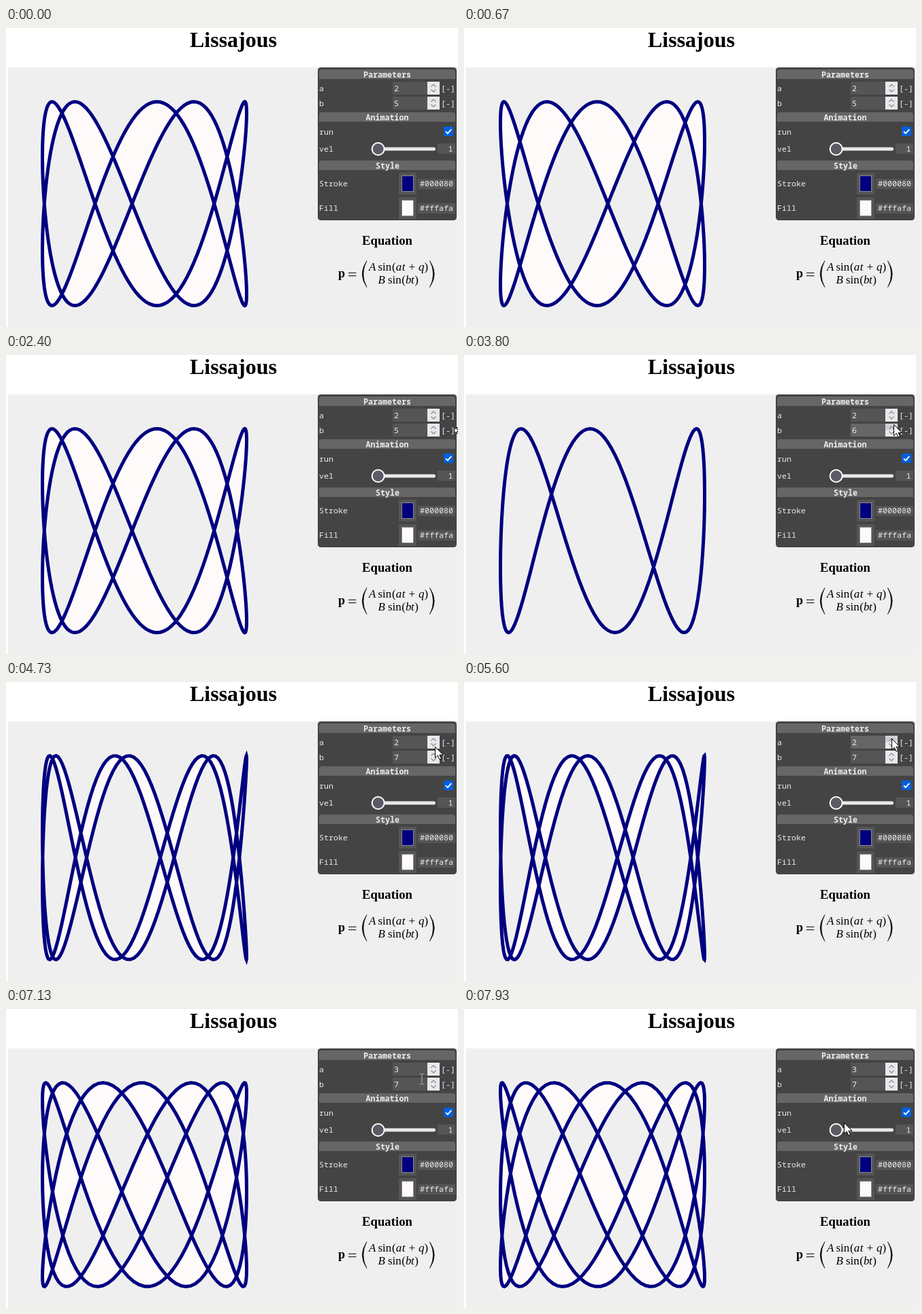
These frames come from a looping animation (664 by 440 pixels, 8 s). An HTML page with a canvas:

```html
<!DOCTYPE html>
<html lang="en">
<head>
<meta charset="utf-8">
<title>Lissajous</title>
<style>
  html, body { margin: 0; width: 100%; height: 100%; overflow: hidden; background: #fff; }
  canvas, svg { position: absolute; left: 0; top: 0; display: block; }
  .mono { font: 11.67px "Noto Sans Mono", "DejaVu Sans Mono", monospace; fill: #ededed; white-space: pre; }
  .head { font-weight: bold; text-anchor: middle; }
  .serif { font-family: "Liberation Serif", "Times New Roman", serif; }
  .title { font-weight: bold; text-anchor: middle; }
  .math { font-size: 17px; }
  .math .i { font-style: italic; }
  .bar { fill: #666; }
  .box { fill: #555; }
  .hover .box { fill: #666; }
  .up { fill: none; }
  .hover .up { fill: #d0d0d7; }
  .chevron { fill: none; stroke: #85858c; stroke-width: 1.2; }
  .check { fill: #0060df; }
  .check.hover { fill: #0250bb; }
</style>
</head>
<body>
<canvas id="stage" width="664" height="440"></canvas>
<svg width="664" height="440" viewBox="0 0 664 440">
  <defs>
    <g id="spinner">
      <rect x="619" width="18" height="19" fill="#e9e9ed"/>
    </g>
    <path id="chevrons" class="chevron" d="M624.5 7.5l3.5-3.5 3.5 3.5M624.5 11.5l3.5 3.5 3.5-3.5"/>
  </defs>

  <text class="serif title" x="334" y="28" font-size="32">Lissajous</text>

  <rect x="458" y="58" width="204" height="225" rx="4.5" fill="#444"/>
  <g class="bar">
    <path id="bar" d="M460 75v-10q0-4 4-4h192q4 0 4 4v10z"/>
    <use href="#bar" y="63"/>
    <use href="#bar" y="134"/>
  </g>
  <g class="mono head">
    <text x="560" y="72.5">Parameters</text>
    <text x="560" y="135.5">Animation</text>
    <text x="560.5" y="206.5">Style</text>
  </g>

  <g id="rowA" transform="translate(0 79)">
    <rect class="box" x="568" width="51" height="19"/>
    <use href="#spinner"/>
    <rect class="up" x="619" width="18" height="9.5"/>
    <use href="#chevrons"/>
    <text class="mono" x="460" y="14">a</text>
    <text class="mono" id="valueA" x="570" y="14">2</text>
    <text class="mono" x="639" y="14">[-]</text>
  </g>
  <g id="rowB" transform="translate(0 101)">
    <rect class="box" x="568" width="51" height="19"/>
    <use href="#spinner"/>
    <rect class="up" x="619" width="18" height="9.5"/>
    <use href="#chevrons"/>
    <text class="mono" x="460" y="14">b</text>
    <text class="mono" id="valueB" x="570" y="14">5</text>
    <text class="mono" x="639" y="14">[-]</text>
  </g>

  <text class="mono" x="460" y="156.5">run</text>
  <rect id="check" class="check" x="643" y="145" width="14" height="14" rx="2"/>
  <path d="M646 152.3l2.8 2.8 5.4-6" fill="none" stroke="#fff" stroke-width="1.9"/>

  <text class="mono" x="460" y="182">vel</text>
  <rect x="547" y="175.5" width="84" height="5" rx="2.5" fill="#e9e9ed"/>
  <circle cx="546.7" cy="178" r="9" fill="#5b5b66" stroke="#fff" stroke-width="2"/>
  <rect class="box" x="634" y="170" width="26" height="15"/>
  <text class="mono" x="649.5" y="182">1</text>

  <g class="mono">
    <text x="460" y="233">Stroke</text>
    <rect class="box" x="577" y="213" width="26" height="32"/>
    <rect x="581.5" y="217.5" width="17" height="23" fill="#000080" stroke="#8a8a8a"/>
    <rect class="box" x="605" y="222" width="55" height="15"/>
    <text x="608" y="233">#000080</text>
    <text x="460" y="269">Fill</text>
    <rect class="box" x="577" y="249" width="26" height="32"/>
    <rect x="581.5" y="253.5" width="17" height="23" fill="#fffafa" stroke="#8a8a8a"/>
    <rect class="box" x="605" y="258" width="55" height="15"/>
    <text x="608" y="269">#fffafa</text>
  </g>

  <text class="serif title" x="560" y="319" font-size="18.72">Equation</text>
  <g class="serif math">
    <text x="488" y="366.5" font-weight="bold" font-size="18">p</text>
    <path d="M503 360.3h11.5M503 364.7h11.5" stroke="#000" stroke-width="1"/>
    <path d="M530 342.5q-13.5 19.5 0 39q-10-19.5 0-39zM622.5 342.5q13.5 19.5 0 39q10-19.5 0-39z" stroke="#000" stroke-width=".6"/>
    <text y="357"><tspan class="i" x="533">A</tspan><tspan x="546.5">sin</tspan><tspan x="567">(</tspan><tspan class="i" x="572.7">a</tspan><tspan class="i" x="581.7">t</tspan><tspan x="591.5">+</tspan><tspan class="i" x="606">q</tspan><tspan x="614.5">)</tspan></text>
    <text y="376"><tspan class="i" x="546.5">B</tspan><tspan x="561">sin</tspan><tspan x="581.3">(</tspan><tspan class="i" x="587">b</tspan><tspan class="i" x="595">t</tspan><tspan x="600.3">)</tspan></text>
  </g>

  <g id="cursor">
    <path id="arrow" d="M.5.5v16.3l3.8-3.6 2.7 6 2.6-1.1-2.7-5.8h5.2z" fill="#fff" stroke="#000"/>
    <path id="beam" d="M-3-7.5h2.2l.8.8.8-.8H3M-3 7.5h2.2l.8-.8.8.8H3M0-6.5v13" fill="none" stroke="#b4b4b4"/>
    <path id="resize" d="M.5 0l5-5v3.5h8V-5l5 5-5 5V1.5h-8V5z" fill="#fff" stroke="#000"/>
  </g>
</svg>
<script>
const LOOP = 8000, FRAME = LOOP / 120;
const $ = id => document.getElementById(id);
const ctx = $('stage').getContext('2d');

// [frame, phase in degrees]
const phaseKeys = [[0, 353], [12, 401], [13, 401], [28, 461], [29, 469], [45, 533],
  [46, 533], [57, 577], [84, 686], [107, 786], [119, 833]];

// [ms, x, y, shape]
const cursorKeys = [[0, 658, 111, ''], [2330, 658, 111, 'resize'], [2660, 652, 110, 'arrow'],
  [3260, 631, 102, 'arrow'], [4530, 631, 102, 'arrow'], [5060, 628, 83, 'arrow'],
  [6260, 628, 83, 'arrow'], [6730, 615, 90, 'beam'], [7130, 611, 103, 'beam'],
  [7330, 595, 124, 'arrow'], [7800, 565, 160, 'arrow'], [7930, 558, 167, 'arrow']];

const within = (t, from, to) => t >= from && t < to;

function segment(keys, t) {
  const i = Math.max(0, keys.findLastIndex(k => k[0] <= t));
  const from = keys[i], to = keys[i + 1] || from;
  const u = to === from ? 0 : (t - from[0]) / (to[0] - from[0]);
  return { from, mix: n => from[n] + (to[n] - from[n]) * u };
}

function drawCurve(a, b, q) {
  const rad = Math.PI / 180;
  ctx.fillStyle = '#efefef';
  ctx.fillRect(3, 58, 661, 382);
  ctx.beginPath();
  for (let t = 0; t < 360; t++) {
    ctx.lineTo(203.5 + 150 * Math.sin((a * t + q) * rad), 258.5 + 150 * Math.sin(b * t * rad));
  }
  ctx.closePath();
  ctx.fillStyle = '#fffafa';
  ctx.fill('evenodd');
  ctx.strokeStyle = '#000080';
  ctx.lineWidth = 5;
  ctx.stroke();
}

function drawCursor(t) {
  const { from, mix } = segment(cursorKeys, t);
  for (const shape of ['arrow', 'beam', 'resize']) {
    $(shape).style.display = from[3] === shape ? '' : 'none';
  }
  $('cursor').setAttribute('transform', `translate(${Math.round(mix(1))} ${Math.round(mix(2))})`);
}

function render(time) {
  const frame = Math.min(119, Math.floor((time % LOOP + 5) / FRAME));
  const t = frame * FRAME;
  const a = t < 5860 ? 2 : 3;
  const b = t < 3590 ? 5 : t < 4060 ? 6 : 7;
  drawCurve(a, b, Math.round(segment(phaseKeys, frame).mix(1)));
  $('valueA').textContent = a;
  $('valueB').textContent = b;
  $('rowA').classList.toggle('hover', within(t, 4860, 7060));
  $('rowB').classList.toggle('hover', within(t, 3130, 4720));
  $('check').classList.toggle('hover', within(t, 7590, 7860));
  drawCursor(t);
}

const start = performance.now();
function tick() {
  render(performance.now() - start);
  requestAnimationFrame(tick);
}
tick();
</script>
</body>
</html>
```
